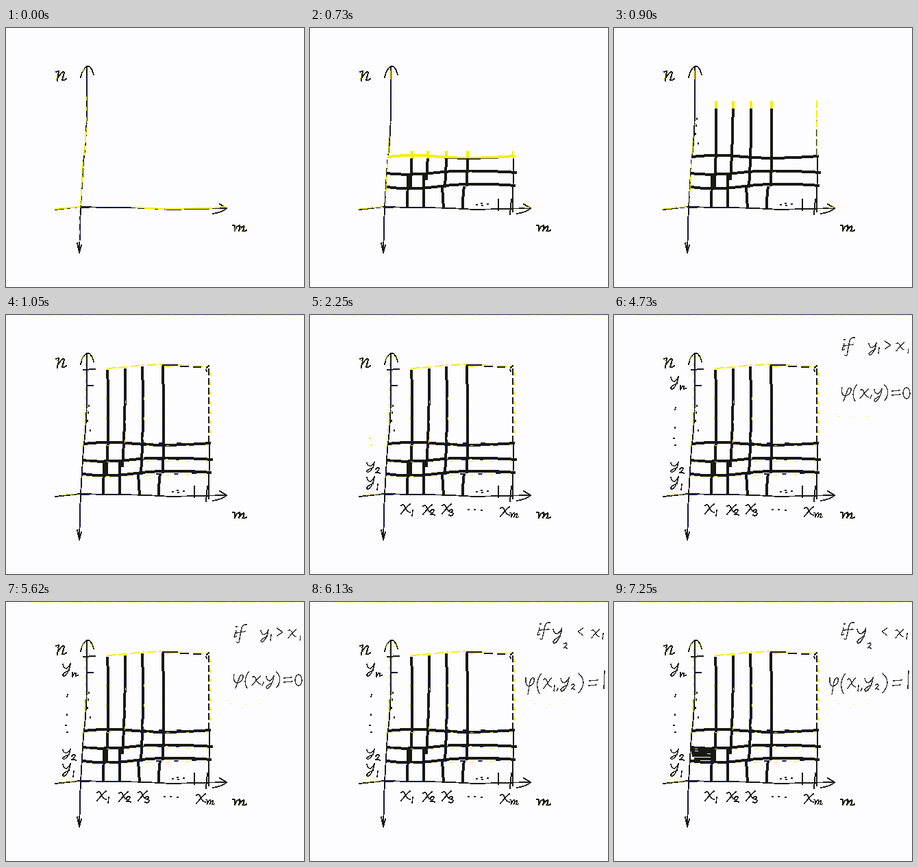
Animation, 435 px wide and 378 px high, one loop 8000 ms. Source, as an HTML page:

```html
<!DOCTYPE html>
<html lang="en">
<head>
<meta charset="utf-8">
<title>Grid of x and y</title>
<style>
html, body { margin: 0; width: 100%; height: 100%; overflow: hidden; background: #fdfdff; }
svg { display: block; width: 435px; height: 378px; fill: none; stroke-linecap: round; stroke-linejoin: round; shape-rendering: crispEdges; }
.ink { stroke: #191914; }
.pen { stroke: #30302e; }
.glow { stroke: #f4f000; }
.navy { stroke: #14144e; }
.dots { stroke-width: 2.4; }
</style>
</head>
<body>
<svg viewBox="0 0 435 378" xmlns="http://www.w3.org/2000/svg">
<defs>
  <path id="x" d="M0 2Q4-1 6 5T13 12M13 0Q7 5 0 14"/>
  <path id="y" d="M0 2Q1 8 5 8Q9 6 11 1M11 1Q10 11 4 18Q0 21 0 17Q3 13 9 11"/>
  <path id="one" d="M1 0L0 8"/>
  <path id="two" d="M0 2Q3-2 5 1Q5 4 0 7Q3 6 6 8"/>
  <path id="three" d="M0 1Q5-2 4 2L2 4Q7 5 4 8Q2 10-1 8"/>
  <path id="em" d="M0 1Q3-1 2 8Q4 1 7 1Q8 3 6 8Q9 2 11 2Q12 4 10 8Q12 9 14 7"/>

  <g id="grid">
    <g id="bars" stroke-width="4" stroke-linecap="butt">
      <path d="M148 80Q151 150 148 200L147 233M143 214L142 263"/>
      <path d="M174 78Q174 160 170 222M166 211L166 263"/>
      <path d="M199 75Q202 150 197 233M193 232L195 263"/>
      <path d="M229 74Q231 160 229 231M225 231Q223 245 223 263"/>
      <path d="M113 188Q150 184 190 188T299 187"/>
      <path d="M111 212Q145 216 185 211T302 211"/>
      <path d="M112 232Q145 237 190 231T300 230"/>
    </g>
    <g stroke-width="2">
      <path d="M113 80L130 79M119 103L127 103M275 250L275 266M294 250L292 272M297 189L296 268"/>
      <path d="M293 77L296 74M292 80L293 82M296 79L296 186" stroke-dasharray="8 6"/>
      <path d="M229 73L250 73M255 75L266 75M274 76L284 76"/>
      <path class="dots" d="M243 258h1M250 256h1M251 259h1M259 257h1M121 132v1M120 142v1M119 154v1M123 168v1"/>
    </g>
  </g>

  <g id="labels" stroke-width="1.6">
    <use href="#x" x="133" y="276"/><use href="#one" x="149" y="285"/>
    <use href="#x" x="165" y="277"/><use href="#two" x="176" y="284"/>
    <use href="#x" x="193" y="276"/><use href="#three" x="204" y="284"/>
    <use href="#x" x="278" y="280"/><use href="#em" transform="translate(292 288) scale(.9)"/>
    <path class="dots" d="M231 284h1M240 284h1M250 285h1"/>
    <use href="#y" transform="translate(83 235)"/><use href="#one" x="98" y="247"/>
    <use href="#y" transform="translate(83 214) scale(1 .8)"/><use href="#two" x="96" y="223"/>
    <use href="#y" transform="translate(83 89)"/>
    <path d="M97 103L97 109Q100 102 102 104L102 108L105 107"/>
    <path d="M90 135L89 138M89 164v1M87 180h1M89 190h1"/>
  </g>

  <g id="ruleA" stroke-width="1.4">
    <path d="M336 42L333 51Q335 52 337 49M336 36h1M351 33Q344 32 343 43L340 59Q338 61 337 58M337 45L349 43"/>
    <use href="#y" transform="translate(372 40) scale(1 .95)"/><use href="#one" x="386" y="48"/>
    <path d="M395 38L404 44L395 50"/>
    <use href="#x" transform="translate(412 40) scale(.9)"/><use href="#one" transform="translate(429 49) scale(.8)"/>
    <path d="M333 106Q331 118 338 118Q347 115 346 107Q342 105 340 112L335 126"/>
    <path d="M355 101Q345 114 352 126"/>
    <use href="#x" x="359" y="108"/><path d="M376 117L374 122"/>
    <use href="#y" x="380" y="107"/>
    <path d="M394 101Q405 112 395 125M406 111L417 110M406 117L418 116"/>
    <ellipse cx="427" cy="114" rx="5" ry="8"/>
  </g>

  <g id="ruleB" stroke-width="1.4">
    <path d="M335 38L332 48Q334 49 336 46M336 32h1M350 30Q343 29 342 40L339 54Q337 56 336 53M336 41L349 40"/>
    <use href="#y" transform="translate(355 37) scale(1.15 1.2)"/><use href="#two" x="370" y="60"/>
    <path d="M399 38L391 43L399 49"/>
    <use href="#x" transform="translate(411 40) scale(.9)"/><use href="#one" x="427" y="46"/>
    <path d="M315 111Q314 123 320 123Q329 120 327 111Q323 109 321 117L318 135"/>
    <path d="M338 104Q327 118 335 134"/>
    <use href="#x" transform="translate(341 111) scale(.9 1.1)"/><use href="#one" x="356" y="122"/><path d="M362 126L360 130"/>
    <use href="#y" transform="translate(366 109) scale(1.1)"/><use href="#two" x="381" y="120"/>
    <path d="M392 104Q406 116 392 133M408 115L420 114M407 122L418 121"/>
    <path d="M430 101L429 126"/>
  </g>

  <g id="cell">
    <path d="M113 216Q130 213 148 216M113 220L147 219M114 224L147 224M117 229L147 229" stroke-width="4.4" stroke-linecap="butt"/>
  </g>
</defs>

<g class="ink" stroke-width="1.8">
  <path d="M118 57L118 110Q118 160 113 195L109 262L108 290L107 328"/>
  <path d="M109 72Q112 59 118 56Q124 54 128 68M104 314L107 328L110 317"/>
  <path d="M72 265L108 261L150 262Q200 262 240 265L322 263"/>
  <path d="M312 257L322 263Q316 269 302 271"/>
  <path d="M73 64L77 63L75 77M76 72Q82 62 85 65L82 76Q85 77 88 74" stroke-width="2"/>
  <use href="#em" transform="translate(331 287) scale(1.45 1.15)" stroke-width="1.6"/>
</g>
<path class="navy" stroke-width="1.2" d="M118 70L118 140M108 262L180 262M108 275L108 310" stroke-dasharray="14 9"/>

<g id="wash0" class="glow" stroke-width="1.8">
  <path d="M72 264L108 261M190 262L230 264M234 264L300 263M306 262L320 261"/>
  <path d="M117 152L114 185M112 196L109 258" stroke-dasharray="16 4"/>
  <path d="M116 60L117 75M111 64L114 59M117 100L117 150M107 265L107 312M73 75L75 70M80 70L82 67M334 291L335 296M342 291L343 294" stroke-width="1" stroke-dasharray="6 9"/>
</g>
<g id="wash1" class="glow" stroke-width="1.2">
  <path d="M72 264L106 261M115 165L113 200L110 258" stroke-dasharray="18 3"/>
  <path d="M117 62L117 75M115 160v1M116 174v1M73 75L75 70M313 262L320 262"/>
</g>
<g id="wash2" class="glow" stroke-width="1.2">
  <path d="M116 70L116 130L112 192M82 263L106 261" stroke-dasharray="5 7"/>
  <path d="M111 66L114 60M122 59L126 64M74 64L76 70"/>
  <path d="M148 78L176 76M183 75L201 73M207 73L228 72M233 75L254 73M275 75L297 75" stroke-width="2" stroke-dasharray="12 5"/>
  <path d="M298 84L298 182" stroke-dasharray="5 9"/>
  <path d="M35 0L435 0" stroke="#ffff70" stroke-dasharray="10 4 22 6"/>
</g>

<g id="art"></g>

<g id="fringe">
  <path class="navy" stroke-width="2" stroke-dasharray="5 21" d="M149 112L149 185M173 112L171 205M200 112L198 228M230 112L228 225M120 187L295 187M118 212L298 210M116 233L298 231"/>
  <path class="glow" stroke-width="1" stroke-dasharray="4 25" d="M146 120L146 180M175 125L173 200M202 120L200 225M118 190L295 190M118 215L295 213M118 236L295 233"/>
</g>
<path id="thinEdge" class="glow" stroke-width="2" stroke-dasharray="9 5" d="M296 107L297 185"/>
<path id="specks" class="glow" stroke="#ffff90" stroke-opacity=".55" d="M322 144h2M326 148h4M347 149h3M368 148h4"/>
</svg>

<script>
const NS = "http://www.w3.org/2000/svg";
const LOOP = 8000;
const art = document.getElementById("art");
const pick = id => document.getElementById(id);

function add(parent, tag, attrs) {
  const node = document.createElementNS(NS, tag);
  for (const key in attrs) node.setAttribute(key, attrs[key]);
  return parent.appendChild(node);
}

// Each layer is wiped in from the bottom, led by a yellow band.
const wipes = [
  { id: "grid", ink: "ink", start: 530, end: 1050, steps: 13, from: 270, to: 34, band: 11 },
  { id: "labels", ink: "ink", start: 1980, end: 2420, steps: 10, from: 300, to: 91, band: 22 },
  { id: "ruleA", ink: "pen", start: 3530, end: 3730, steps: 5, from: 128, to: 20, band: 10, until: 5930 },
  { id: "ruleB", ink: "pen", start: 5930, end: 6130, steps: 5, from: 134, to: 18, band: 10 },
  { id: "cell", ink: "ink", start: 7130, end: 7250, steps: 3, from: 228, to: 210, band: 3 }
];

function clipped(wipe, ink) {
  const id = wipe.id + "-" + ink;
  const clip = add(art, "clipPath", { id });
  const rect = add(clip, "rect", { x: 0, y: 378, width: 435, height: 378 });
  const group = add(art, "g", { class: ink, "clip-path": `url(#${id})` });
  add(group, "use", { href: "#" + wipe.id });
  return { rect, group };
}

for (const wipe of wipes) {
  wipe.glow = clipped(wipe, "glow");
  wipe.dark = clipped(wipe, wipe.ink);
}

function show(node, on) {
  node.style.display = on ? "" : "none";
}

function drawWipe(wipe, t) {
  const { start, end, steps, from, to, band, until = LOOP } = wipe;
  const on = t >= start && t < until;
  const done = t >= end;
  show(wipe.dark.group, on);
  show(wipe.glow.group, on && !done);
  if (!on) return;
  const part = Math.floor((t - start) / (end - start) * steps + 1e-6) / steps;
  const lead = from + (to - from) * Math.min(1, part);
  wipe.glow.rect.setAttribute("y", lead);
  wipe.glow.rect.setAttribute("height", band);
  wipe.dark.rect.setAttribute("y", done ? 0 : lead + band);
}

function draw(t) {
  for (const wipe of wipes) drawWipe(wipe, t);
  show(pick("wash0"), t < 530);
  show(pick("wash1"), t >= 530 && t < 1050);
  show(pick("wash2"), t >= 1050);
  show(pick("fringe"), t >= 1050);
  show(pick("thinEdge"), t >= 850 && t < 1010);
  show(pick("specks"), t >= 3530);
}

function tick() {
  draw(performance.now() % LOOP);
  requestAnimationFrame(tick);
}
tick();
</script>
</body>
</html>
```
